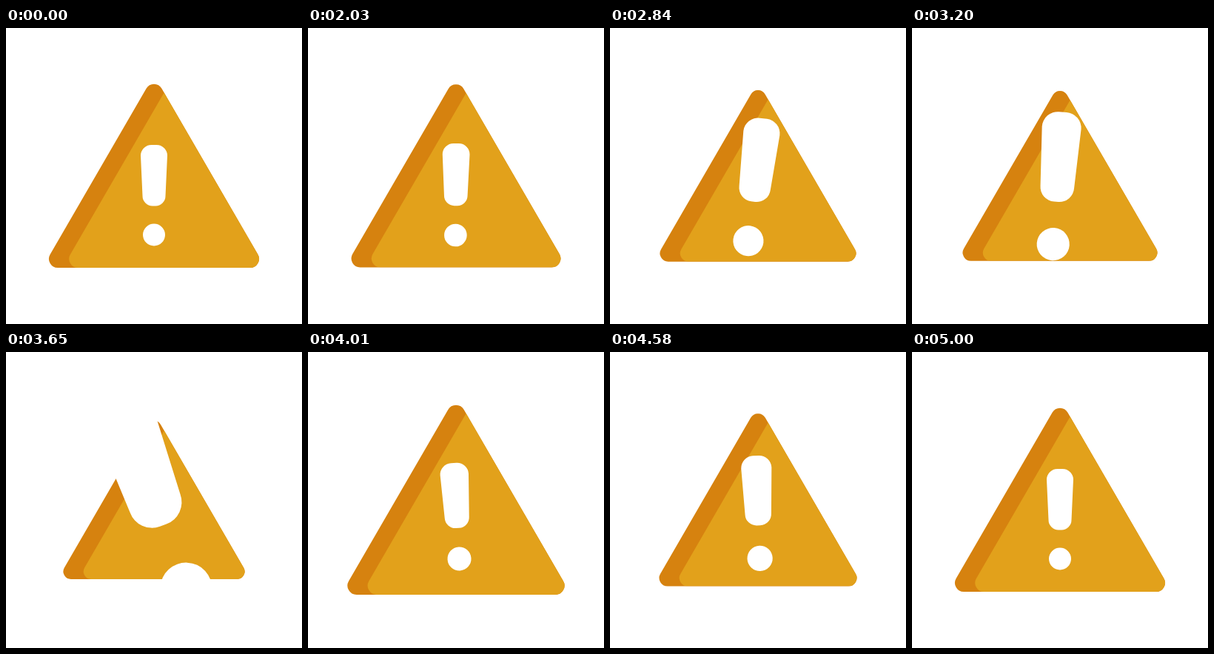
Recreate the animation shown at these times as an HTML page. Size 400 by 400 pixels, loop 5030 ms.

```html
<!DOCTYPE html>
<html lang="en">
<head>
<meta charset="utf-8">
<title>Warning sign</title>
<style>
  html, body { margin: 0; width: 100%; height: 100%; overflow: hidden; background: #fff; }
  svg { display: block; width: 100%; height: 100%; }
</style>
</head>
<body>
<svg viewBox="0 0 400 400">
  <defs>
    <path id="triangle" d="M189.6 81.8A12 12 0 0 1 210.4 81.8L340.4 306A12 12 0 0 1 330 324H70A12 12 0 0 1 59.6 306Z"/>
    <clipPath id="inside"><use href="#triangle"/></clipPath>
  </defs>
  <g id="sign">
    <use href="#triangle" fill="#d6820f"/>
    <g clip-path="url(#inside)"><use id="face" href="#triangle" fill="#e2a11b"/></g>
  </g>
  <g id="mark" fill="#fff">
    <path d="M182 172.5A14.5 14.5 0 0 1 196.5 158H203.5A14.5 14.5 0 0 1 218 172.5L215.5 227A13.5 13.5 0 0 1 202 240.5H198A13.5 13.5 0 0 1 184.5 227Z"/>
    <circle cx="200" cy="279.5" r="15"/>
  </g>
</svg>
<script>
const LOOP = 5030, REST = 2030, STEP = 30;
const EDGE = 27.3; // width of the shaded side, the same at every size
const [sign, face, mark] = ['sign', 'face', 'mark'].map(id => document.getElementById(id));

const easeOut = p => Math.sin(p * Math.PI / 2);
const easeInOut = p => (1 - Math.cos(p * Math.PI)) / 2;

// Lean, hold, burst, recoil, settle and return to rest, counted in steps.
const beats = [0, 28, 36, 55, 75, 87, 100];

// A value that leaves its rest level and swings through the beats.
function swing(rest, lean, burst, recoil, settle) {
  const levels = [0, lean, lean, burst, recoil, settle, 0];
  return step => {
    const i = Math.max(1, beats.findIndex(beat => step <= beat));
    const p = (step - beats[i - 1]) / (beats[i] - beats[i - 1]);
    const eased = i === 1 ? easeOut(p) : easeInOut(p);
    return rest + levels[i - 1] + (levels[i] - levels[i - 1]) * eased;
  };
}

const signSize = swing(1, -0.067, -0.137, 0.122, -0.063);
const markSize = swing(1, 0.372, 1.33, -0.6, 0.155);
const markTilt = swing(0, 7, -20, 5.4, -2.4);
const markX = swing(200, -4.2, 1.2, 1.2, 0.2);
const markY = swing(226.5, -11, -23, 6.8, -8.4);

function draw(time) {
  const t = time % LOOP;
  const step = t < REST ? 0 : Math.floor((t - REST) / STEP) + 1;
  const size = signSize(step);
  sign.setAttribute('transform', `translate(200 199.8) scale(${size}) translate(-200 -199.8)`);
  face.setAttribute('x', EDGE / size);
  mark.setAttribute('transform',
    `translate(${markX(step)} ${markY(step)}) rotate(${markTilt(step)}) scale(${markSize(step)}) translate(-200 -226.5)`);
}

const start = performance.now();
function tick() {
  draw(performance.now() - start);
  requestAnimationFrame(tick);
}
tick();
</script>
</body>
</html>
```
